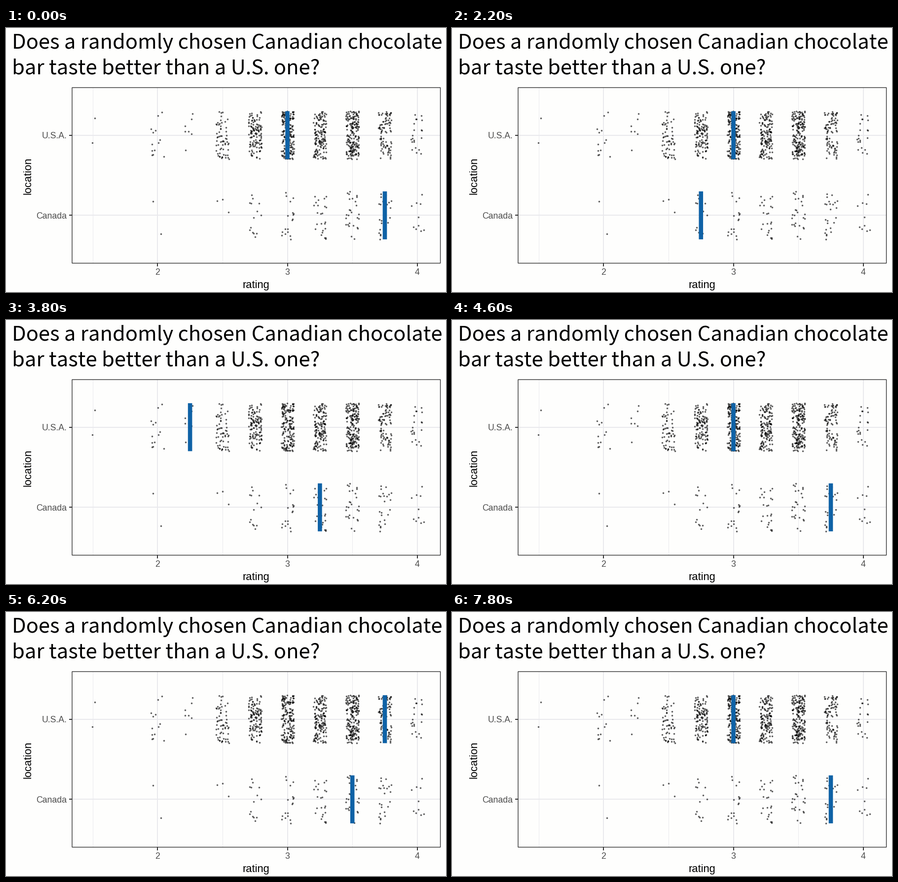
A matplotlib script that plays this animation: 892 px wide and 536 px high, repeating every 8 s.

```python
import random

import matplotlib.pyplot as plt
from matplotlib.animation import FuncAnimation
from matplotlib.patches import Rectangle

W, H, DPI = 892, 536, 100
STEP = 200
PT = 72 / DPI

X2, UNIT = 307.3, 263.25
ROWS = {"U.S.A.": 217.6, "Canada": 380.4}
JITTER_X, JITTER_Y = 13.2, 48.6
LEFT, RIGHT, TOP, BOTTOM = 134, 880.6, 121, 477.5
BAR_W, BAR_H = 8.6, 97.4
DARK, MID, GRID, BLUE = "#333333", "#4d4d4d", "#e9e9ed", "#0f62a6"

# Bars per rating, from 1.5 to 4 in quarter steps
COUNTS = {
    "U.S.A.": [2, 0, 13, 7, 60, 122, 170, 150, 190, 90, 21],
    "Canada": [0, 0, 2, 0, 3, 14, 18, 24, 27, 24, 10],
}
# Rating drawn in each row, a new pair every two steps
DRAWS = {
    "U.S.A.": [3, 3.5, 3.25, 3.25, 3.5, 3.25, 3, 3.5, 2.75, 3.25, 2.25,
               3.25, 3, 2.75, 3.5, 2.75, 3.75, 3, 3.5, 3.75, 3],
    "Canada": [3.75, 3.75, 3.5, 3.5, 3.25, 2.5, 2.75, 4, 3.75, 3, 3.25,
               2.5, 3.75, 3.5, 4, 3.25, 3.5, 3.75, 3, 2.5, 3.75],
}


def rating_x(rating):
    return X2 + (rating - 2) * UNIT


def jittered(counts, row, rng):
    return [
        (rating_x(1.5 + k / 4) + rng.uniform(-JITTER_X, JITTER_X),
         row + rng.uniform(-JITTER_Y, JITTER_Y))
        for k, n in enumerate(counts) for _ in range(n)
    ]


fig = plt.figure(figsize=(W / DPI, H / DPI), dpi=DPI, facecolor="#fefefd")
ax = fig.add_axes([0, 0, 1, 1])
ax.set(xlim=(0, W), ylim=(H, 0))
ax.axis("off")


def line(x, y, color, px):
    ax.plot(x, y, color=color, lw=px * PT, solid_capstyle="butt", zorder=1)


def label(x, y, text, px, color="black", font="Liberation Sans", **kw):
    ax.text(x, y, text, fontsize=px * PT, color=color, family=font,
            va="baseline", **kw)


# Grid, ticks and axis text
for r in (1.5, 2.5, 3.5):
    line([rating_x(r)] * 2, [TOP, BOTTOM], GRID, 1)
for r in (2, 3, 4):
    x = rating_x(r)
    line([x, x], [TOP, BOTTOM], GRID, 2)
    line([x, x], [BOTTOM, BOTTOM + 6], DARK, 2)
    label(x, 501, str(r), 17.6, MID, ha="center")
for name, y in ROWS.items():
    line([LEFT, RIGHT], [y, y], GRID, 2)
    line([LEFT - 6, LEFT], [y, y], DARK, 2)
    label(123.5, y + 6.4, name, 17.6, MID, ha="right")
ax.add_patch(Rectangle((LEFT, TOP), RIGHT - LEFT, BOTTOM - TOP, fill=False,
                       ec=DARK, lw=1.4 * PT, snap=False, zorder=4))
label((LEFT + RIGHT) / 2, 528, "rating", 22, ha="center")
label(50, (TOP + BOTTOM) / 2 + 1, "location", 22, ha="center",
      rotation=90, rotation_mode="anchor")

# Heading
TITLE = ("Does a randomly chosen Canadian chocolate",
         "bar taste better than a U.S. one?")
for k, text in enumerate(TITLE):
    label(12, 42 + 51 * k, text, 41.7, font="Noto Sans CJK JP")

# Dots
rng = random.Random(12)
dots = [p for name, y in ROWS.items() for p in jittered(COUNTS[name], y, rng)]
ax.scatter(*zip(*dots), s=(3.5 * PT) ** 2, c="black", alpha=0.62, lw=0, zorder=3)

# Drawn ratings
bars = {
    name: ax.add_patch(Rectangle((0, y - BAR_H / 2), BAR_W, BAR_H, fc=BLUE,
                                 lw=0, snap=False, zorder=5))
    for name, y in ROWS.items()
}


def update(i):
    for name, bar in bars.items():
        bar.set_x(rating_x(DRAWS[name][(i + 1) // 2]) - BAR_W / 2)
    return list(bars.values())


anim = FuncAnimation(fig, update, frames=40, interval=STEP,
                     repeat=True, repeat_delay=0)
plt.show()
```
